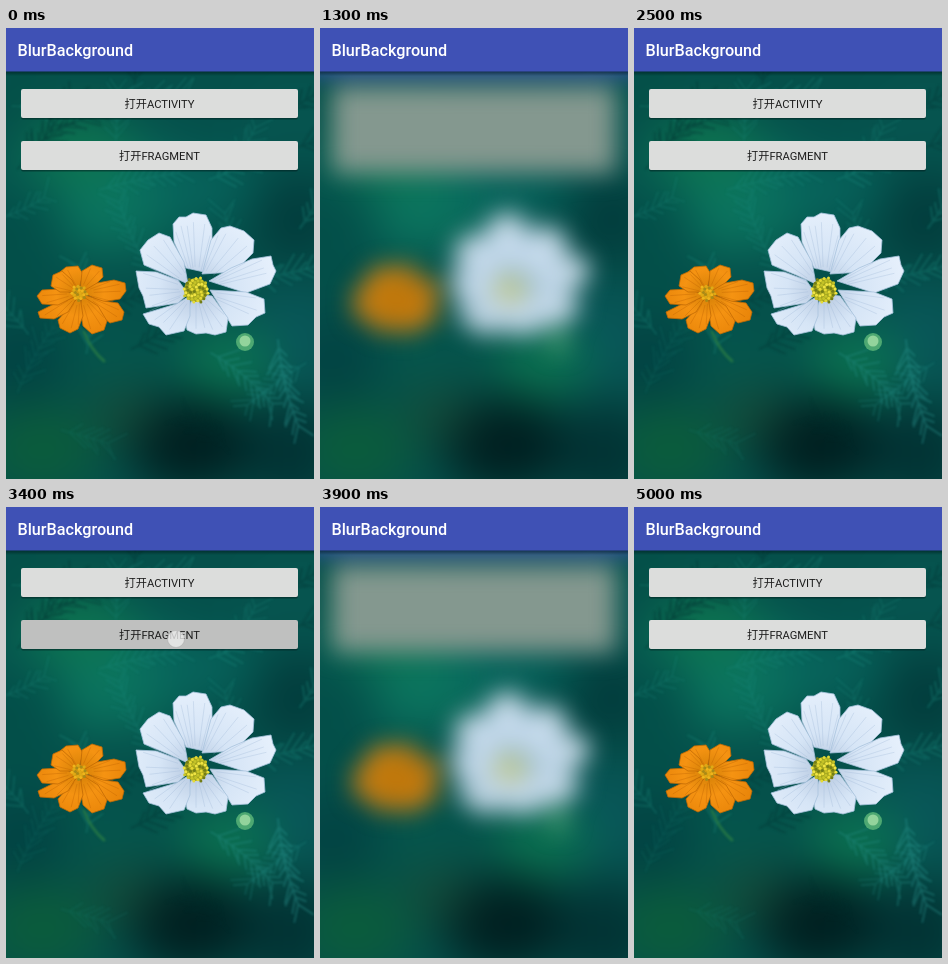
Animation of 308x451 px, one loop 5.3 s. Source, as an HTML page:

```html
<!DOCTYPE html>
<html lang="zh">
<head>
<meta charset="utf-8">
<title>BlurBackground</title>
<style>
  html, body { margin: 0; width: 100%; height: 100%; overflow: hidden; background: #044; }
  svg { display: block; width: 100vw; height: 100vh; }
  text { font-family: Roboto, "Noto Sans CJK SC", "Noto Sans CJK", sans-serif; }
  .title { font-size: 16.2px; font-weight: 500; fill: #fff; }
  .label { font-size: 11.2px; fill: #1c1c1c; text-anchor: middle; }
</style>
</head>
<body>
<svg viewBox="0 0 308 451" preserveAspectRatio="none">
  <defs>
    <filter id="far" filterUnits="userSpaceOnUse" x="-80" y="-80" width="468" height="611" color-interpolation-filters="sRGB"><feGaussianBlur stdDeviation="24"/></filter>
    <filter id="mid" filterUnits="userSpaceOnUse" x="-80" y="-80" width="468" height="611" color-interpolation-filters="sRGB"><feGaussianBlur stdDeviation="12"/></filter>
    <filter id="near" filterUnits="userSpaceOnUse" x="-20" y="-20" width="348" height="491" color-interpolation-filters="sRGB"><feGaussianBlur stdDeviation="1.3"/></filter>
    <filter id="soft" filterUnits="userSpaceOnUse" x="0" y="150" width="308" height="200" color-interpolation-filters="sRGB"><feGaussianBlur stdDeviation=".6"/></filter>
    <radialGradient id="white" gradientUnits="userSpaceOnUse" cx="190" cy="262" r="82">
      <stop offset=".1" stop-color="#bccde3"/><stop offset=".45" stop-color="#d6e5f6"/><stop offset="1" stop-color="#e6f0fc"/>
    </radialGradient>
    <radialGradient id="orange" gradientUnits="userSpaceOnUse" cx="74" cy="265" r="48">
      <stop offset=".1" stop-color="#d98308"/><stop offset=".5" stop-color="#f59312"/><stop offset="1" stop-color="#e98509"/>
    </radialGradient>
    <linearGradient id="shade" x2="0" y2="1">
      <stop stop-color="#001818" stop-opacity=".6"/><stop offset="1" stop-color="#001818" stop-opacity="0"/>
    </linearGradient>
    <clipPath id="stage"><rect width="308" height="451"/></clipPath>
    <g id="backdrop"></g>
    <g id="flowers"></g>
    <g id="bar">
      <rect y="43" width="308" height="5" fill="url(#shade)"/>
      <rect width="308" height="43.5" fill="#3f51b5"/>
      <text class="title" x="11.5" y="27.7">BlurBackground</text>
    </g>
  </defs>
  <g id="page">
    <use href="#backdrop"/>
    <g id="fronds" fill="none" stroke-linecap="round" filter="url(#near)"></g>
    <use href="#flowers" filter="url(#soft)"/>
    <g id="buttons"></g>
    <use href="#bar"/>
  </g>
  <circle id="touch" r="8.5" fill="#ececec" fill-opacity=".8" stroke="#aaa" stroke-opacity=".5"/>
  <g id="overlay">
    <g clip-path="url(#stage)">
      <use href="#backdrop"/>
      <g filter="url(#mid)">
        <rect x="-40" y="-40" width="388" height="84" fill="#3f51b5"/>
        <rect x="12" y="58" width="284" height="87" fill="#84988f"/>
        <g opacity=".92"><use href="#flowers"/></g>
        <ellipse cx="194" cy="246" rx="52" ry="44" fill="#c4daee" opacity=".6"/>
        <ellipse cx="190" cy="262" rx="17" ry="15" fill="#c8cd90" opacity=".7"/>
        <ellipse cx="77" cy="271" rx="28" ry="24" fill="#bd750a" opacity=".85"/>
      </g>
      <use href="#bar"/>
    </g>
  </g>
</svg>
<script>
const $ = id => document.getElementById(id);
let seed = 11;
const rand = (a, b) => {
  seed = (seed * 16807) % 2147483647;
  return a + (b - a) * seed / 2147483647;
};

// Soft foliage tones: cx, cy, rx, ry, colour
const blobs = [
  [90, 165, 85, 50, '#0b755f'], [75, 120, 45, 30, '#0d7450'],
  [20, 215, 35, 60, '#034f49'], [290, 100, 50, 50, '#06544f'],
  [290, 190, 38, 40, '#023c3c'], [190, 160, 55, 25, '#07655d'],
  [290, 310, 45, 45, '#085658'], [222, 335, 42, 30, '#0b7452'],
  [85, 330, 55, 28, '#05564c'], [15, 335, 40, 40, '#024343'],
  [185, 415, 55, 42, '#001f20'], [285, 425, 45, 45, '#023334'],
  [35, 420, 50, 38, '#0b5c3c'], [118, 385, 28, 22, '#164a38'],
  [15, 70, 30, 30, '#045048']
];
$('backdrop').innerHTML =
  '<rect x="-60" y="-60" width="428" height="571" fill="#05504b"/><g filter="url(#far)">' +
  '<rect x="-70" y="-70" width="448" height="591" fill="#05504b"/>' +
  blobs.map(([x, y, rx, ry, c]) =>
    `<ellipse cx="${x}" cy="${y}" rx="${rx * 1.15}" ry="${ry * 1.15}" fill="${c}"/>`).join('') + '</g>';

function frond(x, y, angle, length, color, alpha) {
  let d = `M${x} ${y}`, leaves = '';
  const bend = rand(-.06, .06), steps = Math.round(length / 8);
  for (let i = 0; i < steps; i++) {
    angle += bend;
    x += 8 * Math.cos(angle);
    y += 8 * Math.sin(angle);
    d += `L${x.toFixed(1)} ${y.toFixed(1)}`;
    for (const side of [-1, 1]) {
      const a = angle + side * rand(.5, .9), n = rand(10, 24);
      leaves += `M${x.toFixed(1)} ${y.toFixed(1)}l${(n * Math.cos(a)).toFixed(1)} ${(n * Math.sin(a)).toFixed(1)}`;
    }
  }
  return `<path d="${d}${leaves}" stroke="${color}" stroke-width="${rand(1.2, 2.4).toFixed(1)}" opacity="${alpha}"/>`;
}
let plants = '';
for (let i = 0; i < 24; i++) {
  const y = rand(60, 440);
  plants += frond(rand(-10, 300), y, rand(-2.6, .6), rand(45, 100),
    i % 3 ? '#1b8a7e' : '#01302f', y > 330 ? .17 : .3);
}
plants += frond(272, 312, 1.5, 90, '#2b9690', .38) + frond(205, 325, .5, 80, '#259088', .38) +
  frond(300, 335, 2.6, 75, '#259088', .32);
plants += '<path d="M78 304Q85 322 98 333" stroke="#2b7d45" stroke-width="3" opacity=".7"/>';
$('fronds').innerHTML = plants;

const whitePetals = [
  '180 240 168 214 167 196 173 189 180 189 187 185 200 187 206 200 206 214 198 244',
  '196 246 205 212 215 200 224 198 238 203 248 212 247 225 228 244',
  '203 253 225 240 246 231 265 228 267 237 270 243 264 256 240 265',
  '204 262 240 264 258 271 259 285 250 289 242 297 226 298',
  '188 266 206 268 222 290 220 304 209 307 200 305 190 306 181 302 179 290',
  '184 268 170 276 137 286 143 296 153 299 160 307 178 303 184 288',
  '182 266 172 275 140 280 137 268 133 260 130 243 150 244 172 252',
  '182 256 162 247 138 237 134 222 142 212 153 205 164 209 178 234'
];
const orangePetals = [
  '72 264 56 256 54 244 60 239 72 238 77 246',
  '74 264 76 243 86 237 96 240 97 249 86 260',
  '76 264 91 255 108 252 119 255 120 263 114 271 96 274',
  '76 266 97 273 112 275 118 284 116 292 104 295 90 284',
  '76 268 92 278 101 293 98 302 86 306 77 298 74 280',
  '74 268 77 288 72 301 64 305 54 300 52 292 64 278',
  '72 268 62 284 48 291 34 290 32 284 46 277',
  '72 267 52 277 36 276 31 268 36 262 54 261',
  '72 264 54 264 45 258 47 247 56 243 66 252'
];
const petals = (list, fill, edge) => list.map(p =>
  `<polygon points="${p}" fill="${fill}" stroke="${edge}" stroke-width=".8" stroke-linejoin="round"/>`).join('');

// Fine veins running from the heart of a flower into each petal
function veins(list, cx, cy, color) {
  let d = '';
  for (const p of list) {
    const n = p.split(' ').map(Number);
    for (let i = 4; i < n.length - 4; i += 2) {
      const at = k => `${(cx + (n[i] - cx) * k).toFixed(1)} ${(cy + (n[i + 1] - cy) * k).toFixed(1)}`;
      d += `M${at(.3)}L${at(.88)}`;
    }
  }
  return `<path d="${d}" stroke="${color}" stroke-width=".8" opacity=".4"/>`;
}

function heart(cx, cy, r, count, colors) {
  let s = '';
  for (let i = 0; i < count; i++) {
    const a = i * 2.4, q = r * Math.sqrt((i + .5) / count);
    s += `<circle cx="${(cx + q * Math.cos(a)).toFixed(1)}" cy="${(cy + q * Math.sin(a)).toFixed(1)}" r="1.5" fill="${colors[i % colors.length]}"/>`;
  }
  return s;
}

$('flowers').innerHTML =
  petals(orangePetals, 'url(#orange)', '#c26a05') + veins(orangePetals, 74, 265, '#b85e00') +
  '<circle cx="73" cy="265" r="7" fill="#d49a12"/>' + heart(73, 265, 8, 22, ['#dfaa16', '#a88a18', '#efb51c']) +
  petals(whitePetals, 'url(#white)', '#a9c3dd') + veins(whitePetals, 190, 262, '#9db7d6') +
  '<circle cx="190" cy="262" r="12" fill="#a3a51f"/>' + heart(190, 262, 13, 46, ['#e6da35', '#737d18', '#f0e443', '#c5c329']) +
  '<circle cx="239" cy="314" r="9" fill="#4da872"/><circle cx="239" cy="313" r="5.5" fill="#93d49c"/>';

const button = (y, label) =>
  `<rect x="15" y="${y + 1}" width="277" height="29.5" rx="2" fill="#001c1c" opacity=".5"/>
   <rect class="face" x="15" y="${y}" width="277" height="29" rx="2" fill="#dcdddc"/>
   <text class="label" x="153.5" y="${y + 19}">${label}</text>`;
$('buttons').innerHTML = button(61, '打开ACTIVITY') + button(113, '打开FRAGMENT');
const faces = document.querySelectorAll('.face');

const LOOP = 5300, STEP = 100;
const clamp = v => Math.max(0, Math.min(1, v));
const part = (t, from, to) => clamp((t - from) / (to - from));

function overlayAt(t) {
  if (t < 2200) {
    const p = part(t, 900, 1300);
    return [clamp(p * 1.25), 1 - .2 * (1 - p) ** 2];
  }
  if (t < 3400) {
    const p = part(t, 2200, 2500);
    return [(1 - p) ** 3.5, .8 + .2 * (1 - p) ** 2.6];
  }
  if (t < 4700) return [part(t, 3400, 3900), 1];
  return [(1 - part(t, 4700, 5000)) ** 1.6, 1];
}

function draw(time) {
  const t = Math.floor((time % LOOP) / STEP) * STEP;
  const pressed = t >= 800 && t < 1300 ? 0 : t >= 3400 && t < 3900 ? 1 : -1;
  faces.forEach((f, i) => f.setAttribute('fill', i === pressed ? '#bfc0bf' : '#dcdddc'));

  const touching = t === 800 || t === 3400;
  $('touch').setAttribute('visibility', touching ? 'visible' : 'hidden');
  $('touch').setAttribute('cx', 170);
  $('touch').setAttribute('cy', t < 2000 ? 80 : 132);

  const [alpha, scale] = overlayAt(t);
  const layer = $('overlay');
  layer.setAttribute('visibility', alpha > 0 ? 'visible' : 'hidden');
  layer.setAttribute('opacity', alpha.toFixed(3));
  layer.setAttribute('transform', `translate(154 225.5) scale(${scale.toFixed(4)}) translate(-154 -225.5)`);
}

const start = performance.now();
function tick() {
  draw(performance.now() - start);
  requestAnimationFrame(tick);
}
tick();
</script>
</body>
</html>
```
